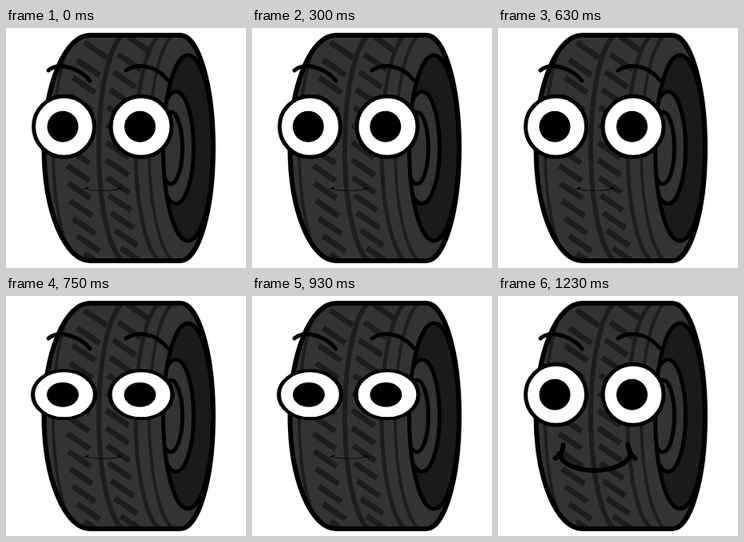
These frames come from a looping animation (300x300 px, 1.5 s). An HTML page:

```html
<!DOCTYPE html>
<html lang="en">
<head>
<meta charset="utf-8">
<title>Tire face</title>
<style>
html, body { margin: 0; width: 100%; height: 100%; overflow: hidden; background: #fff; }
svg { display: block; width: 100vw; height: 100vh; }
.line { fill: none; stroke: #000; stroke-width: 5; stroke-linecap: round; }
.groove { fill: none; stroke: #1d1d1d; }
</style>
</head>
<body>
<svg viewBox="0 0 300 300">
  <defs>
    <path id="body" d="M105 9H218A41 141 0 0 1 218 291H105A57.500 141 0 0 1 105 9Z"/>
    <ellipse id="side" cx="227.500" cy="150" rx="31" ry="116"/>
    <clipPath id="bodyClip"><use href="#body"/></clipPath>
    <clipPath id="sideClip"><use href="#side"/></clipPath>
    <g id="eye">
      <circle r="38" fill="#fff" stroke="#000" stroke-width="5"/>
      <circle class="pupil" r="19.500"/>
    </g>
  </defs>
  <use href="#body" fill="#333"/>
  <g id="tread" clip-path="url(#bodyClip)"></g>
  <use href="#side" fill="#1a1a1a"/>
  <g clip-path="url(#sideClip)" fill="#333" stroke="#000" stroke-width="5">
    <ellipse cx="212.500" cy="149.500" rx="22" ry="70"/>
    <ellipse cx="206" cy="150" rx="14.500" ry="45"/>
  </g>
  <use href="#side" class="line"/>
  <use href="#body" class="line" style="stroke-width:6"/>
  <path class="line" d="M53 53Q62 46 74 48Q94 52 105 66M150 53Q161 46 174 48Q191 51 202 65"/>
  <g id="eyes"></g>
  <g id="mouth">
    <path class="line" style="stroke-width:6" d="M-45 -4C-38 24 36 24 45 -4M-40 -15Q-40 -3 -50 2M41 -15Q42 -3 50 2"/>
  </g>
</svg>
<script>
const NS = 'http://www.w3.org/2000/svg';
const LOOP = 1500, STEP = 30;
const $ = id => document.getElementById(id);

function add(parent, tag, attrs) {
  const node = document.createElementNS(NS, tag);
  for (const key in attrs) node.setAttribute(key, attrs[key]);
  return parent.appendChild(node);
}

// Where a tread column, placed at mid height, lies at height y.
function columnX(column, y) {
  return column + 36 * (1 - Math.sqrt(1 - ((y - 150) / 143) ** 2));
}

function drawTread() {
  const groove = (d, width) => add($('tread'), 'path', { class: 'groove', d, 'stroke-width': width });
  for (const [x, width] of [[59, 4], [116, 6], [162, 5], [179, 4]]) {
    groove(`M${x + 36} 7A36 143 0 0 0 ${x + 36} 293`, width);
  }
  for (const [column, top] of [[76, 18], [125, 11]]) {
    for (let y = top; y < 290; y += 22) {
      groove(`M${columnX(column, y)} ${y}l28 19`, 7);
    }
  }
}

// Linear interpolation through [time, value] pairs.
function track(keys, t) {
  let [t0, v0] = keys[0];
  for (const [t1, v1] of keys) {
    if (t <= t1) return t1 === t0 ? v1 : v0 + (v1 - v0) * (t - t0) / (t1 - t0);
    [t0, v0] = [t1, v1];
  }
  return v0;
}

const look = [[0, -1.5], [210, -18], [420, 19], [540, 19], [630, -1.5]];
const squash = [[0, 0], [690, 0], [750, 1], [840, -0.2], [930, 1], [960, 0]];
const smile = [[0, 0], [1110, 0], [1230, 1]];

drawTread();
const eyes = [72.5, 169].map(x => {
  const node = $('eye').cloneNode(true);
  node.removeAttribute('id');
  $('eyes').append(node);
  return { x, node, pupil: node.querySelector('.pupil') };
});

function render(now) {
  const t = Math.floor(now % LOOP / STEP) * STEP;
  const s = track(squash, t), m = track(smile, t), gaze = track(look, t);
  for (const { x, node, pupil } of eyes) {
    node.setAttribute('transform', `translate(${x} 123.3) scale(${1 + 0.025 * s} ${1 - 0.21 * s})`);
    pupil.setAttribute('cx', gaze);
  }
  $('mouth').setAttribute('transform', `translate(121.5 201) scale(${0.48 + 0.52 * m} ${0.13 + 0.87 * m})`);
}

const start = performance.now();
function tick() {
  render(performance.now() - start);
  requestAnimationFrame(tick);
}
tick();
</script>
</body>
</html>
```
